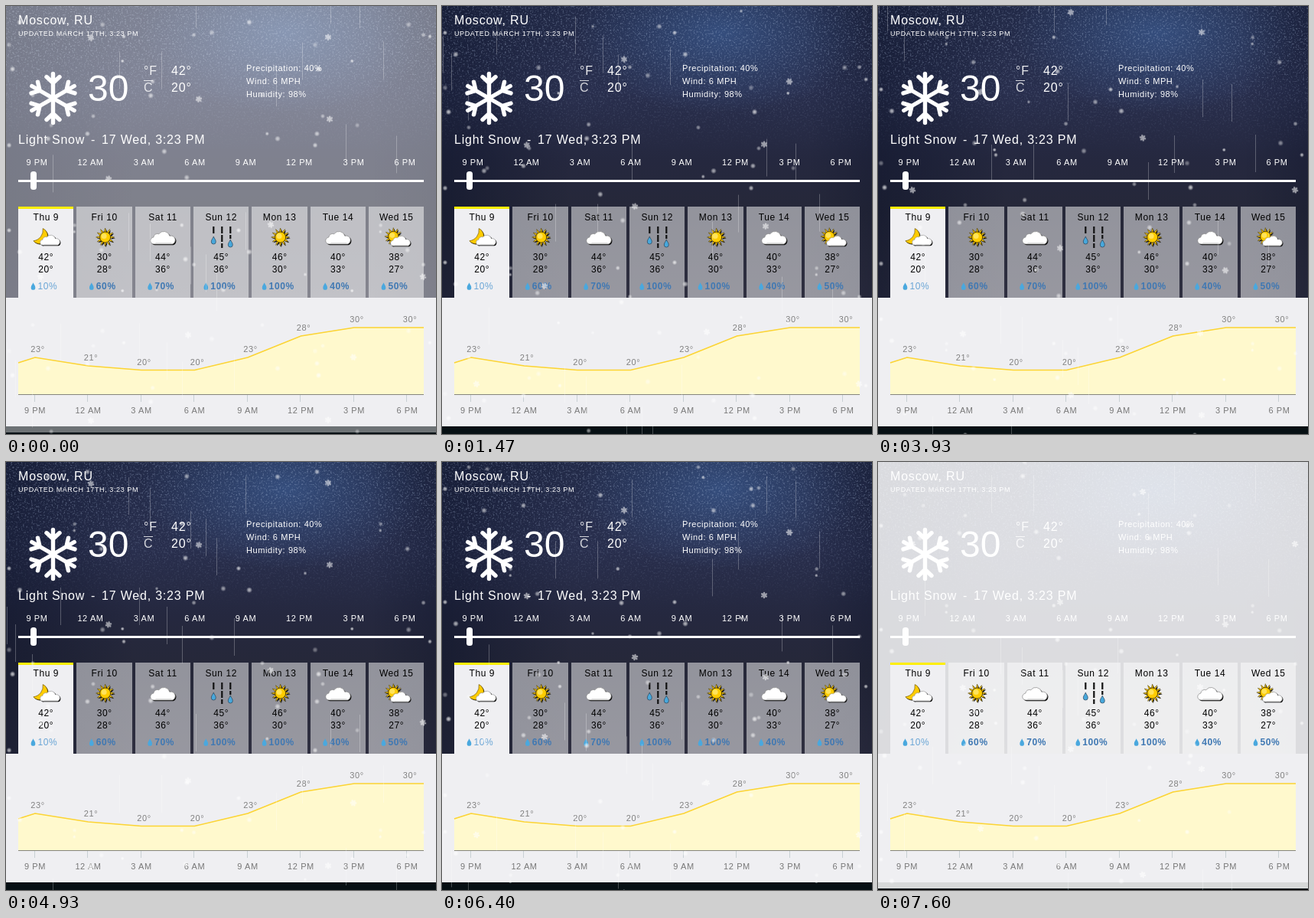
These frames come from a looping animation (562 by 559 pixels, 7.67 s). An HTML page:

```html
<!DOCTYPE html>
<html lang="en">
<head>
<meta charset="utf-8">
<title>Weather</title>
<style>
  html, body { margin: 0; width: 100%; height: 100%; overflow: hidden; background: #071014; }
  svg { display: block; width: 562px; height: 559px; }
  text { font-family: "Liberation Sans", Arial, sans-serif; letter-spacing: .6px; white-space: pre; }
  text[font-size="16"] { letter-spacing: .8px; }
</style>
</head>
<body>
<svg id="stage" viewBox="0 0 562 559" xmlns="http://www.w3.org/2000/svg">
  <defs>
    <linearGradient id="night" x2="0" y2="1">
      <stop offset="0" stop-color="#222a48"/>
      <stop offset=".2" stop-color="#292f4e"/>
      <stop offset=".36" stop-color="#25283f"/>
      <stop offset=".48" stop-color="#262839"/>
      <stop offset=".7" stop-color="#303041"/>
      <stop offset="1" stop-color="#242636"/>
    </linearGradient>
    <linearGradient id="edge">
      <stop offset="0" stop-color="#0c1228" stop-opacity=".5"/>
      <stop offset=".3" stop-color="#0c1228" stop-opacity="0"/>
      <stop offset=".85" stop-color="#0c1228" stop-opacity="0"/>
      <stop offset="1" stop-color="#0c1228" stop-opacity=".3"/>
    </linearGradient>
    <radialGradient id="glow">
      <stop offset="0" stop-color="#4a78bc" stop-opacity=".45"/>
      <stop offset="1" stop-color="#4a78bc" stop-opacity="0"/>
    </radialGradient>
    <radialGradient id="soft">
      <stop offset=".3" stop-color="#fff"/>
      <stop offset="1" stop-color="#fff" stop-opacity="0"/>
    </radialGradient>
    <linearGradient id="fade" x2="0" y2="1">
      <stop offset=".3" stop-color="#fff"/>
      <stop offset="1" stop-color="#000"/>
    </linearGradient>
    <mask id="upper"><rect width="562" height="190" fill="url(#fade)"/></mask>
    <filter id="stardust" x="0" y="0" width="1" height="1">
      <feTurbulence type="fractalNoise" baseFrequency=".45" numOctaves="3" seed="4"/>
      <feColorMatrix values="0 0 0 0 .45  0 0 0 0 .55  0 0 0 0 .75  4 0 0 0 -2.1"/>
    </filter>
    <pattern id="flakes" width="500" height="500" patternUnits="userSpaceOnUse"></pattern>
    <pattern id="dots400" width="400" height="400" patternUnits="userSpaceOnUse"></pattern>
    <pattern id="dots300" width="300" height="300" patternUnits="userSpaceOnUse"></pattern>
    <path id="cloudShape" d="M-14 9a5 5 0 0 1-1-10a6 6 0 0 1 8-5a9 9 0 0 1 16 3a6 6 0 0 1 4 12z"/>
    <path id="drop" d="M0-5C1-2 3-1 3 2A3 3 0 0 1-3 2C-3-1-1-2 0-5z"/>
    <g id="cloud">
      <use href="#cloudShape" x="1.5" y="1.5" fill="#111"/>
      <use href="#cloudShape" fill="#fff" stroke="#888" stroke-width=".8"/>
      <path d="M-12 7.5H12" stroke="#ddd" stroke-width="1.5"/>
    </g>
    <path id="rays" d=""/>
    <g id="sun">
      <use href="#rays" x="1.2" y="1.2" fill="#111"/>
      <use href="#rays" fill="#fc0" stroke="#423400" stroke-width=".5"/>
      <circle r="7" fill="#fc0" stroke="#5a4500"/>
      <circle cx="-1.5" cy="-1.5" r="3.5" fill="#ffe35a"/>
    </g>
    <path id="moon" d="M2-12A11 11 0 1 1-11 5A15 15 0 0 0 2-12z"/>
  </defs>

  <rect width="562" height="559" fill="url(#night)"/>
  <ellipse cx="365" cy="35" rx="190" ry="105" fill="url(#glow)"/>
  <rect width="562" height="559" fill="url(#edge)"/>
  <g mask="url(#upper)"><rect width="562" height="190" filter="url(#stardust)" opacity=".3"/></g>
  <rect y="549" width="562" height="10" fill="#071014"/>
  <rect id="flash" width="562" height="557" fill="#fff" opacity="0"/>
  <g id="ui"></g>
  <rect width="562" height="559" fill="url(#dots300)"/>
  <rect width="562" height="559" fill="url(#dots400)"/>
  <rect width="562" height="559" fill="url(#flakes)"/>
  <g id="rain" stroke="#fff" stroke-opacity=".26"></g>
</svg>
<script>
const NS = 'http://www.w3.org/2000/svg';
const byId = id => document.getElementById(id);
const ui = byId('ui');

function add(parent, tag, attrs) {
  const el = document.createElementNS(NS, tag);
  for (const key in attrs) el.setAttribute(key, attrs[key]);
  return parent.appendChild(el);
}
function label(str, x, y, size, fill = '#fff', extra = {}) {
  add(ui, 'text', { x, y, 'font-size': size, fill, ...extra }).textContent = str;
}
const middle = { 'text-anchor': 'middle' };
const icon = (href, x, y, scale = 1, extra = {}) =>
  add(ui, 'use', { href: '#' + href, transform: `translate(${x} ${y}) scale(${scale})`, ...extra });

function drawHeader() {
  label('Moscow, RU', 16, 24, 16);
  label('UPDATED MARCH 17TH, 3:23 PM', 16, 39, 9);
  label('30', 107, 124, 48, '#fff', { style: 'letter-spacing:0' });
  label('°F', 180, 90, 16, '#fff', { opacity: .9 });
  label('C', 180, 112, 16, '#fff', { opacity: .8 });
  add(ui, 'path', { d: 'M180 97.5h12', stroke: '#fff', opacity: .8 });
  label('42°', 216, 90, 16);
  label('20°', 216, 112, 16);
  ['Precipitation: 40%', 'Wind: 6 MPH', 'Humidity: 98%'].forEach((s, i) => label(s, 314, 85 + 17 * i, 11));
  label('Light Snow', 16, 180, 16);
  label('-', 111, 180, 16);
  label('17 Wed, 3:23 PM', 125, 180, 16);

  const flake = add(ui, 'g', {
    transform: 'translate(61.5 120.5)', stroke: '#fff', fill: 'none',
    'stroke-width': 5.4, 'stroke-linecap': 'round', 'stroke-linejoin': 'round'
  });
  for (let a = 0; a < 360; a += 60)
    add(flake, 'path', { d: 'M0 0V-32M-8.5-28L0-20L8.5-28', transform: `rotate(${a})` });
}

const hours = ['9 PM', '12 AM', '3 AM', '6 AM', '9 AM', '12 PM', '3 PM', '6 PM'];

function drawSlider() {
  const centers = [40.5, 110.5, 180.5, 247, 313.5, 383.5, 454.5, 521.5];
  hours.forEach((h, i) => label(h, centers[i], 208, 11, '#fff', middle));
  add(ui, 'rect', { x: 16, y: 227, width: 530, height: 3, fill: '#fff' });
  add(ui, 'rect', { x: 32, y: 216, width: 8, height: 24, rx: 3.5, fill: '#fff' });
}

const icons = {
  moonCloud(x, y) {
    icon('moon', x - 6, y + 1, .95, { fill: '#111' });
    icon('moon', x - 7, y, .95, { fill: '#fc0', stroke: '#6b5200', 'stroke-width': .7 });
    icon('cloud', x + 5, y + 4, .7);
  },
  sun(x, y) { icon('sun', x, y); },
  cloud(x, y) { icon('cloud', x, y + 1, .88); },
  rain(x, y) {
    for (const [dx, end] of [[-11, -5], [0, 14], [11, 2]])
      add(ui, 'path', {
        d: `M${x + dx} ${y - 14}V${y + end}`, stroke: '#111',
        'stroke-width': 2.2, 'stroke-dasharray': '9 2'
      });
    for (const [dx, dy] of [[-11, 4], [11, 8]])
      icon('drop', x + dx, y + dy, 1, { fill: '#48a8dc', stroke: '#234', 'stroke-width': .6 });
  },
  sunCloud(x, y) {
    icon('sun', x - 5, y - 1, .95);
    icon('cloud', x + 5, y + 5, .7);
  }
};

function drawCards() {
  const days = [
    ['Thu 9', 'moonCloud', 42, 20, 10], ['Fri 10', 'sun', 30, 28, 60], ['Sat 11', 'cloud', 44, 36, 70],
    ['Sun 12', 'rain', 45, 36, 100], ['Mon 13', 'sun', 46, 30, 100], ['Tue 14', 'cloud', 40, 33, 40],
    ['Wed 15', 'sunCloud', 38, 27, 50]
  ];
  days.forEach(([day, kind, high, low, chance], i) => {
    const exact = 16 + 76.33 * i, left = Math.round(exact), width = Math.round(exact + 72.2) - left;
    const c = exact + 36.3, active = i === 0;
    add(ui, 'rect', {
      x: left, y: 262, width, height: 119,
      fill: active ? '#efeff2' : '#fff', 'fill-opacity': active ? 1 : .5
    });
    if (active) add(ui, 'rect', { x: left, y: 262, width, height: 3, fill: '#ffee00' });
    label(day, c, 280, 12, '#000', middle);
    icons[kind](c + 1, 302);
    label(high + '°', c, 332, 12, '#000', middle);
    label(low + '°', c, 348, 12, '#000', middle);
    const x = c - (chance === 100 ? 14 : 10.8);
    icon('drop', x - 6, 366, .95, { fill: '#4aa8de' });
    label(chance + '%', x, 370, 12, active ? '#6ba6d6' : '#3f78b3', { 'font-weight': active ? 400 : 700 });
  });
}

function drawChart() {
  add(ui, 'rect', { y: 381, width: 562, height: 168, fill: '#efeff2' });
  const temps = [23, 21, 20, 20, 23, 28, 30, 30];
  const heights = [459, 470, 475.5, 475.5, 459, 431, 420, 420];
  const tickX = i => 38 + 69.5 * i;
  const curve = 'M16 466' + heights.map((y, i) => `L${tickX(i)} ${y}`).join('') + 'L546 420';
  add(ui, 'path', { d: curve + 'V507H16z', fill: '#fff9cd' });
  add(ui, 'path', { d: curve, fill: 'none', stroke: '#fcd433', 'stroke-width': 1.6 });
  add(ui, 'path', { d: 'M16 507.5H546', stroke: '#85857c' });
  temps.forEach((v, i) => {
    const x = tickX(i);
    add(ui, 'path', { d: `M${Math.floor(x) - .5} 508v9`, stroke: '#c8d0d4' });
    label(v + '°', x + 3.5, heights[i] - 7, 11, '#808080', middle);
    label(hours[i], x, 532, 11, '#777', middle);
  });
}

function drawWeather() {
  const flakes = [[111, 35], [421, 34], [252, 115], [423, 141], [134, 219], [346, 279], [45, 347], [238, 423], [454, 452]];
  for (const [x, y] of flakes)
    add(byId('flakes'), 'path', {
      d: 'M0-3V3M-2.8-1.6L2.8 1.6M-2.8 1.6L2.8-1.6', transform: `translate(${x} ${y}) rotate(${x % 60})`,
      stroke: '#fff', 'stroke-width': 2.4, 'stroke-linecap': 'round', opacity: .55
    });

  let seed = 11;
  const random = () => (seed = seed * 16807 % 2147483647) / 2147483647;
  function scatter(size, points, count) {
    while (points.length < count) points.push([random() * (size - 8) + 4, random() * (size - 8) + 4]);
    for (const [cx, cy] of points)
      add(byId('dots' + size), 'circle', { cx, cy, r: 2.4 + random() * 1.6, fill: 'url(#soft)', opacity: .35 + random() * .3 });
  }
  scatter(400, [[197, 368], [284, 368], [391, 348], [269, 32], [4, 48]], 20);
  scatter(300, [[4, 291]], 8);

  const drops = [
    [148, 77], [203, 77], [424, 592], [387, 65], [353, 100], [510, 187], [61, 212], [462, 598], [160, 288],
    [188, 302], [248, 597], [444, 172], [313, 287], [298, 472], [230, 482], [210, 457], [71, 432], [1, 457],
    [275, 367], [261, 342], [241, 332], [12, 480], [34, 519], [174, 432], [493, 64]
  ];
  for (const [x, y] of drops)
    for (const shift of [0, -600, -1200])
      add(byId('rain'), 'path', { d: `M${x + .5} ${y + shift}v49` });
}

byId('rays').setAttribute('d', Array.from({ length: 12 }, (_, i) => {
  const at = (r, d) => {
    const a = (i + d) * Math.PI / 6;
    return `${(r * Math.cos(a)).toFixed(1)} ${(r * Math.sin(a)).toFixed(1)}`;
  };
  return `M${at(7, -.38)}L${at(12, 0)}L${at(7, .38)}z`;
}).join(''));

drawHeader();
drawSlider();
drawCards();
drawChart();
drawWeather();

const LOOP = 7670, STEP = 200 / 3;
const FADE_END = 900, RISE_START = 6950, RISE_END = 7600;

// The sky starts bright and fades to night, then brightens again before the loop ends.
function flashAt(t) {
  if (t < FADE_END) return .41 * (1 - t / FADE_END) ** 1.6;
  return .84 * Math.max(0, (t - RISE_START) / (RISE_END - RISE_START));
}

function render(t) {
  const step = Math.floor((t + 3.5) / STEP);
  const tick = step < 6 ? step + 1 : step; // one held step early in the loop
  const time = tick * STEP;
  const slide = (id, speed, size) =>
    byId(id).setAttribute('patternTransform', `translate(0 ${(time * speed % size).toFixed(2)})`);
  slide('flakes', .1, 500);
  slide('dots400', .04, 400);
  slide('dots300', .03, 300);
  const fall = ((95.2 * (tick - 39)) % 600 + 600) % 600;
  byId('rain').setAttribute('transform', `translate(0 ${fall.toFixed(1)})`);
  byId('flash').setAttribute('opacity', flashAt(step * STEP).toFixed(3));
}

const start = performance.now();
function loop() {
  render((performance.now() - start) % LOOP);
  requestAnimationFrame(loop);
}
loop();
</script>
</body>
</html>
```
